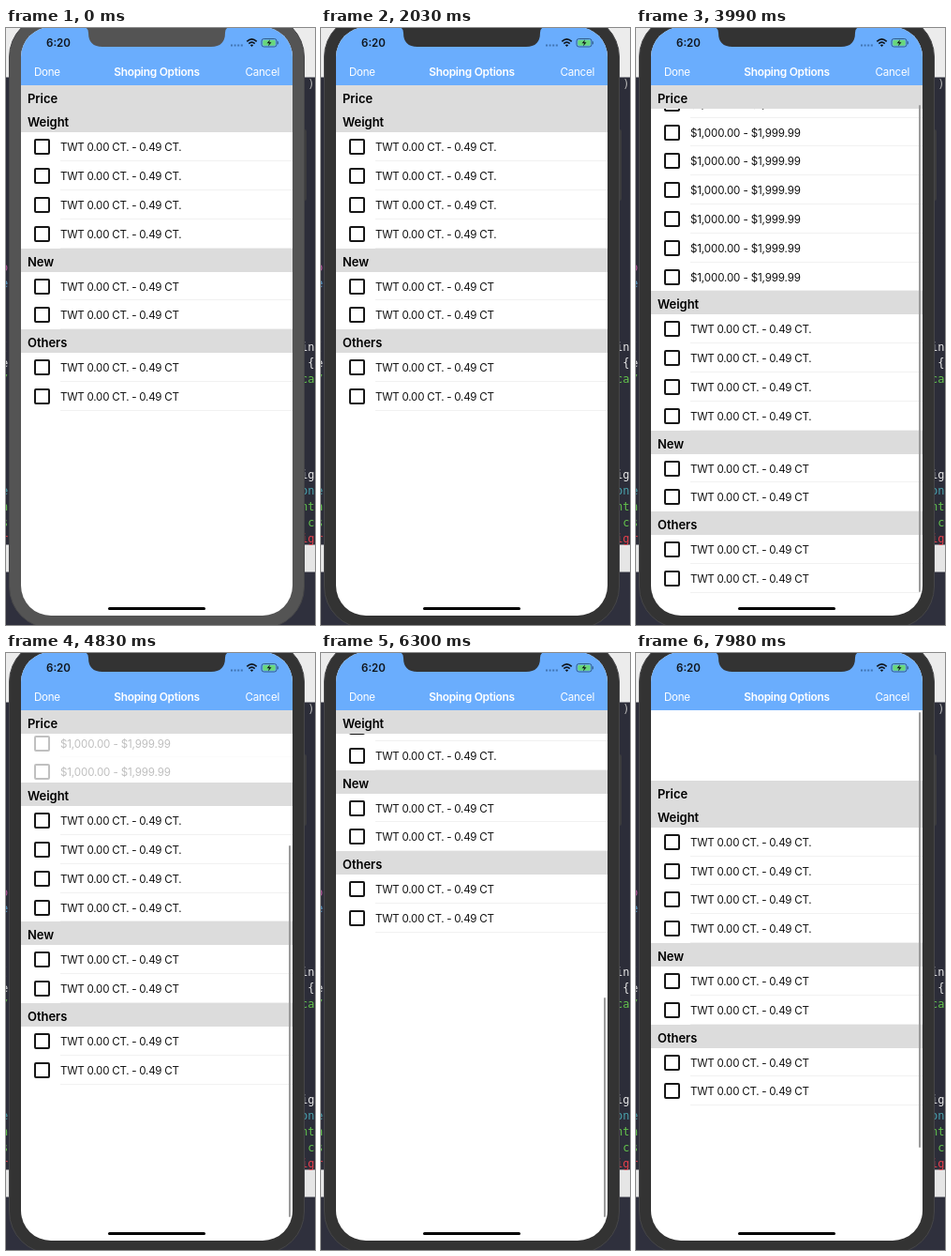
An HTML page that plays this animation: 330x636 px, repeating every 8000 ms.

```html
<!DOCTYPE html>
<html lang="en">
<head>
<meta charset="utf-8">
<title>Filter list</title>
<style>
  html, body { margin: 0; width: 100%; height: 100%; overflow: hidden; }
  #stage {
    --bezel: #333;
    position: relative; width: 330px; height: 636px; overflow: hidden;
    background: linear-gradient(#ececec 52px, #2c2d39 53px 550px, #e6e6e6 551px 579px, #2f303d 580px);
    font: 11.6px/1 Inter, Roboto, sans-serif; letter-spacing: -.27px; white-space: pre;
  }
  #stage div, #stage span, #stage svg { position: absolute; box-sizing: border-box; }
  #stage .code { font: 12px/17px "DejaVu Sans Mono", monospace; letter-spacing: 0; }
  .button { left: 317px; top: 108px; width: 4px; height: 76px; border-radius: 2px; background: #3c3c3e; }
  #bezel {
    left: 3px; top: -14px; width: 316px; height: 654px; border-radius: 45px;
    background: var(--bezel); border: 1.5px solid #464648;
  }
  #screen {
    left: 16px; top: -1px; width: 290px; height: 627px;
    border-radius: 32px; overflow: hidden; background: #fff;
  }
  #list { left: 0; top: 62.4px; width: 290px; height: 564.6px; overflow: hidden; color: #111; }
  .head {
    left: 0; width: 290px; height: 25px; padding-left: 7px; z-index: 1;
    background: #dcdcdc; color: #000; font-size: 13px; font-weight: 600; line-height: 28px; letter-spacing: -.05px;
  }
  .rows { left: 0; width: 290px; overflow: hidden; }
  .row { left: 42px; width: 248px; height: 30.8px; line-height: 32px; border-bottom: .8px solid #f1f1f1; }
  .row::before {
    content: ""; position: absolute; left: -28px; top: 7px; width: 17px; height: 17px;
    box-sizing: border-box; border: 2px solid #161616; border-radius: 2px;
  }
  .price { letter-spacing: -.14px; }
  #bar { left: 286px; width: 2px; border-radius: 1px; background: #9c9c9c; z-index: 2; }
  #nav { left: 0; top: 0; width: 290px; height: 62.4px; background: #6aadfd; color: #fff; }
  #nav span { top: 42px; line-height: 12px; }
  #nav .title { left: 0; width: 290px; text-align: center; font-size: 11.9px; font-weight: 600; letter-spacing: -.25px; }
  #nav .clock { left: 27px; top: 11px; color: #10151c; font-weight: 600; letter-spacing: 0; }
  #home { left: 93px; top: 618px; width: 104px; height: 3px; border-radius: 2px; background: #000; }
</style>
</head>
<body>
<div id="stage">
  <div id="editor"></div>
  <div class="button"></div>
  <div id="bezel"></div>
  <div id="screen">
    <div id="list"><div id="bar"></div></div>
    <div id="nav">
      <span class="clock">6:20</span>
      <span style="left:14px">Done</span>
      <span class="title">Shoping Options</span>
      <span style="right:14px">Cancel</span>
    </div>
    <div id="home"></div>
  </div>
  <svg width="330" height="40" style="left:0;top:0">
    <path d="M82-1Q88-1 88 5Q88 20 103 20H219Q234 20 234 5Q234-1 240-1Z" fill="var(--bezel)"/>
    <path d="M240 18.5H253" stroke="#10305c" stroke-opacity=".45" stroke-width="1.8" stroke-dasharray="2 1.6"/>
    <path d="M257.3 14.3Q262.5 9.6 267.7 14.3M259.3 16.6Q262.5 13.8 265.7 16.6" fill="none" stroke="#10151c" stroke-width="1.7"/>
    <path d="M260.8 18.2Q262.5 16.8 264.2 18.2L262.5 20Z" fill="#10151c"/>
    <rect x="273" y="11.5" width="16" height="8.5" rx="2.4" fill="none" stroke="#2c5580" stroke-width=".9"/>
    <rect x="274.3" y="12.8" width="13.4" height="5.9" rx="1.2" fill="#69d77c"/>
    <path d="M290.3 14.3v3" stroke="#2c5580"/>
    <path d="M282 12.2L278.6 16.2H281L280 19.4L283.5 15.2H281.1Z" fill="#10151c"/>
  </svg>
</div>
<script>
const ROW = 30.8, HEAD = 25, VIEW = 540, LOOP = 8000;
const $ = id => document.getElementById(id);

function add(parent, cls, text = '') {
  const el = document.createElement('div');
  el.className = cls;
  el.textContent = text;
  parent.append(el);
  return el;
}

// Editor text showing on both sides of the phone
const codeLines = [
  [38, '', ' )', '#b5b5b5'], [97, ')', '', '#6fc24a'], [233, 'o', '', '#b5549b'],
  [250, 'e', '', '#5a9fd0'], [318, '(', 'in', '#e8e8e8'], [335, 'e', ' {', '#e8e8e8'],
  [352, '/', 'ca', '#63c34c'], [419, '(', '', '#3f9c98'], [454, '.', 'igu', '#e8e8e8'],
  [471, 'e', 'on', '#4aa3ae'], [488, 'n', 'nt', '#63c34c'], [505, 's', ' c', '#63c34c'],
  [522, 'r', 'ig', '#e8404c'], [566, ')', '', '#aaa']
];
for (const [y, left, right, color] of codeLines) {
  for (const [text, x] of [[left, -5], [right, 315]]) {
    add($('editor'), 'code', text).style.cssText = `left:${x}px;top:${y - 9}px;color:${color}`;
  }
}

const sections = [
  ['Price', 7, '$1,000.00 - $1,999.99', ' price'],
  ['Weight', 4, 'TWT 0.00 CT. - 0.49 CT.', ''],
  ['New', 2, 'TWT 0.00 CT. - 0.49 CT', ''],
  ['Others', 2, 'TWT 0.00 CT. - 0.49 CT', '']
].map(([title, count, text, cls]) => {
  const rows = add($('list'), 'rows');
  for (let i = 0; i < count; i++) add(rows, 'row' + cls, text).style.top = i * ROW + 'px';
  return { head: add($('list'), 'head', title), rows, full: count * ROW };
});

const smooth = x => x * x * (3 - 2 * x);
const linear = x => x;
const easeOut = x => 1 - (1 - x) ** 2;
const settle = x => 1 - (1 - x) ** 3;

// Value at time t along [time, value, easing] points
function track(points, t) {
  let [t0, v0] = points[0];
  for (const [t1, v1, ease = smooth] of points) {
    if (t < t1) return t <= t0 ? v0 : v0 + (v1 - v0) * ease((t - t0) / (t1 - t0));
    t0 = t1; v0 = v1;
  }
  return v0;
}

const openness = [[2200, 0], [2600, 1], [4580, 1], [4960, 0]];
const offset = [
  [2900, 0], [3290, 90.7, easeOut], [3430, 96], [3920, 21.6, settle],
  [4580, 21.6], [4960, 0],
  [5560, 0], [6300, 110], [6440, 113], [7240, 0], [7980, -74.5, linear], [8000, -75]
];
const barAlpha = [[2900, 0], [3000, 1], [4040, 1], [4270, 0], [4600, 0], [4760, 1]];
const bezelGrey = [[65, 84], [240, 51]];

function placeBar(off, height) {
  const over = Math.max(0, off - (height - VIEW));
  let size = Math.min(538, VIEW * VIEW / height) - over;
  let top = VIEW - size;
  if (off < 0) {
    size = 538 + off;
    top = 2;
  } else if (!over) {
    top = 2 + off * (538 - size) / (height - VIEW);
  }
  $('bar').style.top = top + 'px';
  $('bar').style.height = size + 'px';
}

function draw(t) {
  const open = track(openness, t), off = track(offset, t);
  let y = -off;
  sections.forEach(({ head, rows, full }, i) => {
    const shown = i ? full : full * open;
    const end = y + HEAD + shown;
    head.style.top = Math.max(y, Math.min(0, end - HEAD)) + 'px';
    rows.style.top = y + HEAD + 'px';
    rows.style.height = shown + 'px';
    if (!i) rows.style.opacity = open;
    y = end;
  });
  placeBar(off, y + off);
  $('bar').style.opacity = track(barAlpha, t);
  const g = track(bezelGrey, t);
  $('stage').style.setProperty('--bezel', `rgb(${g},${g},${g})`);
}

const start = performance.now();
function tick() {
  draw((performance.now() - start) % LOOP);
  requestAnimationFrame(tick);
}
tick();
</script>
</body>
</html>
```
